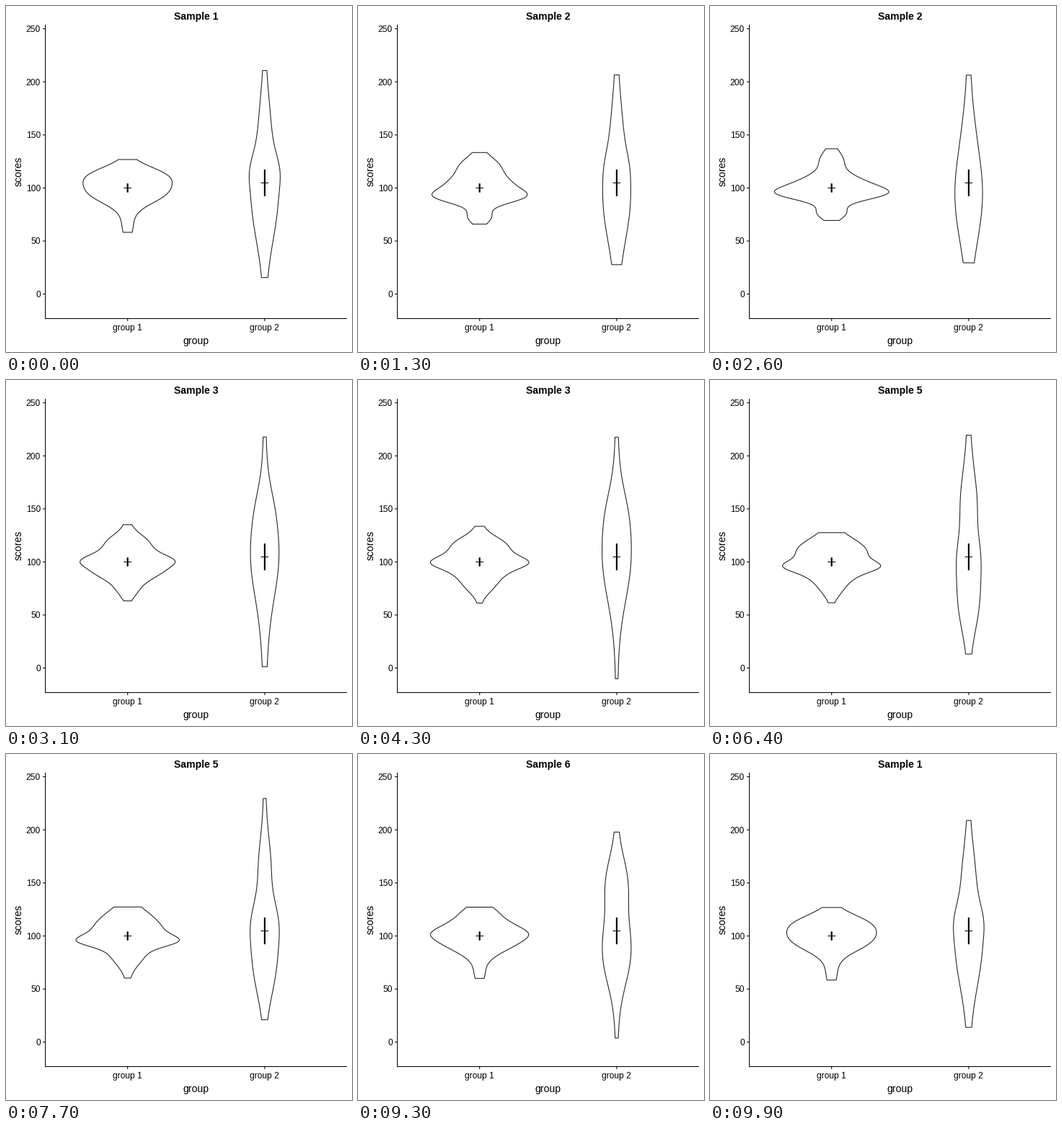
A matplotlib script for the animation above (10 s loop, 480 by 480 pixels).

```python
import math

import matplotlib.pyplot as plt
import numpy as np
from matplotlib.animation import FuncAnimation
from matplotlib.patches import Polygon

SIZE, DPI = 480, 72
FRAMES, INTERVAL = 100, 100
SAMPLES, STEPS = 6, 8
STARTS = 9 + np.round(np.arange(SAMPLES) * 16.85)  # first moving frame of each change
LEFT, RIGHT, TOP, BOTTOM = 54.6, 473, 26, 433.6
UNIT = (RIGHT - LEFT) / 2.2
CENTERS = LEFT + 0.6 * UNIT, LEFT + 1.6 * UNIT
MIDDLE = (LEFT + RIGHT) / 2
FLOOR = 1.5  # thinnest half width
U = np.linspace(0, 1, 300)

plt.rcParams["font.family"] = "Liberation Sans"


def violin(top, bottom, *bumps):
    """Outline heights and half widths of a sum of (height, mean, sd) bells."""
    y = top + U * (bottom - top)
    h = sum(a * np.exp(-0.5 * ((y - m) / s) ** 2) for a, m, s in bumps)
    return y, h + FLOOR


WIDE = [
    violin(213, 314, (43, 235, 13.3), (46, 260, 15), (6, 302, 18)),
    violin(197.5, 295.7, (74, 258.5, 9.5), (29, 241, 11), (13.5, 211, 12),
           (19.5, 286, 8.5)),
    violin(201.8, 310, (46, 251, 21.5), (22.5, 253, 7.5), (10, 224, 9),
           (9, 287, 11)),
    violin(211, 306, (54, 238, 17), (38, 265.5, 10), (12.5, 290, 11)),
    violin(212.2, 310.8, (43, 238, 19.3), (43.5, 259.5, 7.5), (19.5, 281, 14.5)),
    violin(212.4, 311, (61, 252, 19.7), (7, 249, 7), (10, 216, 9),
           (4.5, 306, 11)),
]
TALL = [
    violin(89.5, 376.8, (16.8, 265, 60), (5, 227, 22), (3.7, 150, 42)),
    violin(99.2, 348, (18.2, 265, 60), (3, 150, 45)),
    violin(72.3, 414.4, (19, 243, 59), (3.8, 175, 32)),
    violin(128.5, 414.9, (19.3, 212, 50), (8, 330, 45)),
    violin(45.3, 359.4, (16, 285, 43), (12.5, 218, 31), (4.2, 145, 32)),
    violin(111, 396.5, (17.8, 278, 43), (14, 182, 37)),
]
SHAPES = np.array([WIDE, TALL])  # group, sample, (y, half width), point

fig = plt.figure(figsize=(SIZE / DPI, SIZE / DPI), dpi=DPI, facecolor="white")
ax = fig.add_axes([0, 0, 1, 1])
ax.set_xlim(0, SIZE)
ax.set_ylim(SIZE, 0)
ax.axis("off")


def line(x0, y0, x1, y1, width=1.07):
    ax.plot([x0, x1], [y0, y1], color="black", lw=width,
            solid_capstyle="butt", snap=False, zorder=3)


def label(x, y, text, size, **kw):
    kw = {"ha": "center", "va": "baseline", **kw}
    return ax.text(x, y, text, fontsize=size, color="black", **kw)


def score_y(score):
    return 399.6 - 1.472 * score


line(LEFT, TOP, LEFT, BOTTOM + 0.5)
line(LEFT - 0.5, BOTTOM, RIGHT, BOTTOM)
for score in range(0, 251, 50):
    y = score_y(score)
    line(LEFT - 3.5, y, LEFT, y)
    label(48.1, y + 4.5, str(score), 12, ha="right")

for n, (cx, mean, error) in enumerate(zip(CENTERS, (100, 104.8), (4.2, 12.6)), 1):
    line(cx, BOTTOM, cx, BOTTOM + 3.5)
    label(cx, 450, f"group {n}", 12)
    line(cx, score_y(mean - error), cx, score_y(mean + error), 2.13)
    line(cx - 5.3, score_y(mean), cx + 5.3, score_y(mean))

label(MIDDLE, 469, "group", 14)
label(22, (TOP + BOTTOM) / 2, "scores", 14, rotation=90, rotation_mode="anchor")
title = label(MIDDLE, 19, "", 14, weight="bold")

outlines = [ax.add_patch(Polygon([(0, 0)], closed=True, fc="white", ec="#222222",
                                 lw=1.07, joinstyle="miter", snap=False, zorder=2))
            for _ in CENTERS]


def draw(frame):
    pos = np.clip((frame - STARTS + 1) / STEPS, 0, 1).sum()
    k, t = int(pos), pos % 1
    for outline, cx, shapes in zip(outlines, CENTERS, SHAPES):
        y, h = (1 - t) * shapes[k % SAMPLES] + t * shapes[(k + 1) % SAMPLES]
        xs = np.concatenate([cx - h, (cx + h)[::-1]])
        ys = np.concatenate([y, y[::-1]])
        outline.set_xy(np.column_stack([xs, ys]))
    title.set_text(f"Sample {math.ceil(pos - 0.5) % SAMPLES + 1}")
    return [*outlines, title]


anim = FuncAnimation(fig, draw, frames=FRAMES, interval=INTERVAL,
                     repeat=True, repeat_delay=0, blit=False)
plt.show()
```
